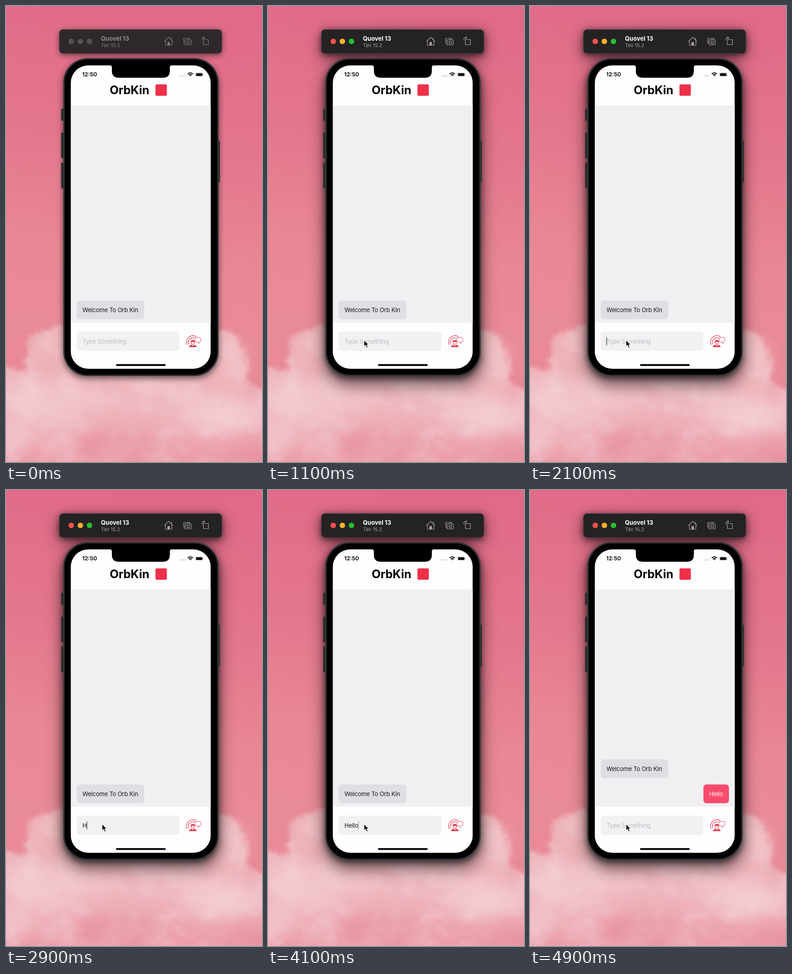
Write an HTML page that moves like this. It is 561 px wide and 998 px high and loops after 5000 ms.

```html
<!DOCTYPE html>
<html lang="en">
<head>
<meta charset="utf-8">
<title>Chat demo</title>
<style>
html, body { margin: 0; height: 100%; overflow: hidden; background: #e57b90; }
svg { position: absolute; left: 0; top: 0; width: 561px; height: 998px; }
text { font-family: Inter, Roboto, sans-serif; }
.msg { font-size: 13px; letter-spacing: -.22px; }
#bar { --body: #2f282a; --title: #918b8c; --sub: #7d7778; --icon: #837d7e; }
#bar.on { --body: #252223; --title: #fff; --sub: #a19d9e; --icon: #a9a5a6; }
#dots circle { fill: #585253; }
#bar.on #dots :nth-child(1) { fill: #f4514f; }
#bar.on #dots :nth-child(2) { fill: #fdb02b; }
#bar.on #dots :nth-child(3) { fill: #27c033; }
#icons { fill: none; stroke: var(--icon); stroke-width: 1.2; stroke-linejoin: round; }
</style>
</head>
<body>
<!-- sky and clouds -->
<svg viewBox="0 0 561 998">
  <defs>
    <linearGradient id="sky" gradientUnits="userSpaceOnUse" x1="350" y1="0" x2="210" y2="998">
      <stop stop-color="#e06a88"/>
      <stop offset=".3" stop-color="#e3768c"/>
      <stop offset=".55" stop-color="#e98894"/>
      <stop offset=".72" stop-color="#e98b97"/>
      <stop offset="1" stop-color="#e98795"/>
    </linearGradient>
    <linearGradient id="haze" gradientUnits="userSpaceOnUse" y1="700" x2="0" y2="998">
      <stop stop-color="#edb5b9"/>
      <stop offset=".35" stop-color="#edb1b8"/>
      <stop offset=".65" stop-color="#eeb3bb"/>
      <stop offset="1" stop-color="#eb9ca8"/>
    </linearGradient>
    <filter id="cloud" filterUnits="userSpaceOnUse" x="-60" y="640" width="681" height="420" color-interpolation-filters="sRGB">
      <feTurbulence type="fractalNoise" baseFrequency=".03" numOctaves="4" seed="8" result="fine"/>
      <feTurbulence type="fractalNoise" baseFrequency=".012 .016" numOctaves="4" seed="3" result="coarse"/>
      <feGaussianBlur in="SourceGraphic" stdDeviation="6"/>
      <feDisplacementMap in2="fine" scale="26" xChannelSelector="R" yChannelSelector="G" result="puff"/>
      <feColorMatrix in="coarse" values="0 0 0 0 .96  0 0 0 0 .84  0 0 0 0 .86  1.3 0 0 0 -.5"/>
      <feComposite in2="puff" operator="in" result="light"/>
      <feMerge><feMergeNode in="puff"/><feMergeNode in="light"/></feMerge>
    </filter>
    <filter id="soft" x="-50%" y="-50%" width="200%" height="200%"><feGaussianBlur stdDeviation="18"/></filter>
  </defs>
  <rect width="561" height="998" fill="url(#sky)"/>
  <g filter="url(#cloud)">
    <path fill="url(#haze)" d="M-50 800 Q10 790 48 800 Q38 765 50 732 Q80 703 130 702 L455 712 Q500 710 517 738 Q532 770 530 815 Q540 852 615 850 V1050 H-50Z"/>
  </g>
  <g filter="url(#soft)" fill="#f5d4d7" opacity=".6">
    <ellipse cx="65" cy="865" rx="75" ry="34"/>
    <ellipse cx="465" cy="890" rx="75" ry="40"/>
    <ellipse cx="25" cy="935" rx="45" ry="30"/>
    <ellipse cx="185" cy="860" rx="50" ry="22"/>
    <ellipse cx="500" cy="775" rx="20" ry="40"/>
  </g>
  <g filter="url(#soft)" fill="#e58797" opacity=".5">
    <ellipse cx="235" cy="965" rx="90" ry="32"/>
    <ellipse cx="545" cy="990" rx="55" ry="30"/>
    <ellipse cx="552" cy="825" rx="14" ry="24"/>
  </g>
</svg>

<svg viewBox="0 0 561 998">
  <defs>
    <filter id="near" x="-20%" y="-40%" width="140%" height="180%"><feGaussianBlur stdDeviation="7"/></filter>
    <filter id="far" x="-30%" y="-80%" width="160%" height="260%"><feGaussianBlur stdDeviation="18"/></filter>
    <clipPath id="screen"><rect x="142" y="130" width="306.500" height="664" rx="38"/></clipPath>
  </defs>

  <g id="raised" filter="url(#far)" opacity=".55">
    <rect x="117" y="62" width="356" height="53" rx="8"/>
    <rect x="124" y="132" width="343" height="696" rx="52"/>
  </g>
  <g filter="url(#near)" opacity=".55">
    <rect x="117" y="54" width="356" height="53" rx="8"/>
    <rect x="125" y="119" width="341" height="696" rx="52"/>
  </g>

  <!-- window bar -->
  <g id="bar">
    <rect x="117" y="51.500" width="356" height="52.500" rx="8" fill="var(--body)" stroke="#4b4345"/>
    <g id="dots"><circle cx="143" cy="77.500" r="6"/><circle cx="163" cy="77.500" r="6"/><circle cx="183" cy="77.500" r="6"/></g>
    <text x="208" y="76" font-size="13" font-weight="700" fill="var(--title)">Quovel 13</text>
    <text x="208" y="90" font-size="11" fill="var(--sub)">Tav 15.2</text>
    <g id="icons">
      <path d="M347 78 L356.500 68.500 L366 78 M362.500 74 V69.500 M349.500 76 V86 H363.500 V76"/>
      <path d="M354.500 86 V79.500 H358.500 V86" fill="var(--icon)"/>
      <path d="M392.500 81 H389.500 V71 H402.500 V73.500"/>
      <path d="M392.500 74.500 H396 L397.500 73 H401.500 L403 74.500 H405.800 V85 H392.500Z"/>
      <circle cx="399.300" cy="79.700" r="2.800"/>
      <path d="M432.500 73.500 H443.500 V84.500 H432.500Z M429.500 75 V71.500 Q429.500 69.500 432 69.500 H435 M432.800 67 L435.300 69.500 L432.800 72"/>
    </g>
  </g>

  <!-- phone body -->
  <g fill="#292a2c" stroke="#3b3a3c" stroke-width=".7">
    <rect x="121" y="225" width="8" height="26" rx="1.500"/>
    <rect x="121" y="277" width="8" height="56" rx="1.500"/>
    <rect x="121" y="343" width="8" height="56" rx="1.500"/>
    <rect x="461" y="295" width="7.500" height="91" rx="1.500"/>
  </g>
  <rect x="126" y="114.500" width="339.500" height="695" rx="53" fill="#242628" stroke="#414446" stroke-width="1.200"/>
  <rect x="129" y="117.500" width="333.500" height="689" rx="50"/>

  <g clip-path="url(#screen)">
    <rect x="142" y="130" width="307" height="665" fill="#fffeff"/>
    <rect x="142" y="219" width="307" height="474" fill="#f1eff2"/>
    <path d="M142 218.500 H449" stroke="#e6e4e7" stroke-width=".7"/>
    <path d="M228 129 V130 Q232 130 232 135 V142 Q232 157 247 157 H344 Q359 157 359 142 V135 Q359 130 363 130 V129Z"/>
    <text x="167" y="154" font-size="12.300" font-weight="600">12:50</text>
    <path d="M380.500 153 H393" stroke="#b9b7ba" stroke-width="2" stroke-dasharray="2 1.500"/>
    <g fill="none" stroke="#000" stroke-width="2">
      <path d="M398.300 148.700 Q404 143.700 409.700 148.700 M400.800 151.200 Q404 148.500 407.200 151.200"/>
      <path d="M402.300 152 L404 154 L405.700 152Z" fill="#000" stroke="none"/>
    </g>
    <rect x="415.300" y="146.300" width="16.400" height="7.600" rx="2.300" fill="none" stroke="#aaa" stroke-width=".8"/>
    <rect x="416.500" y="147.300" width="13.800" height="5.600" rx="1.300"/>
    <path d="M432.800 148.700 V151.500" stroke="#999"/>

    <text x="270.500" y="193" font-size="25.500" font-weight="700" text-anchor="middle" letter-spacing="-.2">OrbKin</text>
    <rect x="327.500" y="171.500" width="25" height="25" rx="3" fill="#ee3049"/>

    <g id="welcome">
      <rect x="155" y="644.500" width="148" height="41" rx="7" fill="#e0dee3"/>
      <text class="msg" x="167.500" y="669.700" fill="#19181a">Welcome To Orb Kin</text>
    </g>
    <g id="reply">
      <rect x="380" y="644.500" width="56" height="41" rx="7" fill="#f94b6b"/>
      <text class="msg" x="392.500" y="669.700" fill="#fff">Hello</text>
    </g>

    <rect x="155" y="712.500" width="225" height="42.500" rx="7" fill="#f2f0f3"/>
    <text class="msg" id="field" x="167.500" y="738.600"></text>
    <rect id="caret" y="725" width="2" height="18" rx="1"/>

    <!-- send button -->
    <g fill="none" stroke="#e4384e" stroke-width="1.200" stroke-linecap="round">
      <path d="M397 741.500 A14 14 0 0 1 417 723.500 M400.500 740 A9.700 9.700 0 0 1 413 727"/>
      <path d="M405.800 735 V737 Q406 740.500 409.300 740.500 Q412.700 740.500 412.800 737 V735"/>
      <path d="M405.300 735 Q405 731.500 409.300 731.500 Q413.700 731.500 413.300 735 Q409 734 405.300 735Z" fill="#e4384e"/>
      <path d="M401.500 746 Q401.700 742.500 406.500 741.700 L409.300 744.500 L412 741.700 Q417 742.500 417.300 746Z" fill="#e4384e" stroke-width=".6"/>
      <path d="M416 725.500 H425 Q427 725.500 427 728 V732.500 Q427 735 425 735 H423.500 L422 739 L420.500 735 H416 Q414.300 735 414.300 732.500 V728 Q414.300 725.500 416 725.500Z" fill="#fff" stroke-width=".9"/>
    </g>
    <rect x="241" y="783.800" width="109" height="4" rx="2"/>
  </g>

  <path id="pointer" d="M0 0 V14.500 L3.300 11.400 L5.700 17 L8.200 15.900 L5.900 10.500 H10.400Z" fill="#000" stroke="#fff" stroke-width="1.100" stroke-linejoin="round"/>
</svg>

<script>
const LOOP = 5000, FOCUS = 1000, CLICK = 1600, TYPE = 2800, KEY = 220, SEND = 4600;
const WORD = "Hello";
const el = id => document.getElementById(id);
const show = (id, on) => el(id).style.visibility = on ? "visible" : "hidden";
const clamp = x => Math.max(0, Math.min(1, x));

// Full for a moment after a reset, then fades out and back.
function blink(age) {
  const p = age % 1000;
  return p < 650 ? 1 - clamp((p - 350) / 150) : clamp((p - 850) / 150);
}

function draw(t) {
  const focused = t >= FOCUS, sent = t >= SEND;
  const count = sent || t < TYPE ? 0 : Math.min(WORD.length, 1 + Math.floor((t - TYPE) / KEY));
  const field = el("field"), caret = el("caret");

  el("bar").classList.toggle("on", focused);
  show("raised", focused);
  show("reply", sent);
  el("welcome").setAttribute("transform", `translate(0 ${sent ? -55 : 0})`);

  field.textContent = count ? WORD.slice(0, count) : "Type Something";
  field.setAttribute("fill", count ? "#19181a" : "#bfbdc1");

  const reset = count ? TYPE + (count - 1) * KEY : CLICK + 400;
  caret.setAttribute("x", count ? 167 + field.getComputedTextLength() : 167);
  caret.setAttribute("fill", count ? "#858387" : "#56806a");
  caret.style.opacity = t >= CLICK && !sent ? blink(Math.max(0, t - reset)) : 0;

  const slide = clamp((t - 500) / 450);
  show("pointer", t >= 500);
  el("pointer").setAttribute("transform", `translate(210.500 ${703 + 28 * slide})`);
}

function frame(now) {
  draw(now % LOOP);
  requestAnimationFrame(frame);
}
requestAnimationFrame(frame);
</script>
</body>
</html>
```
